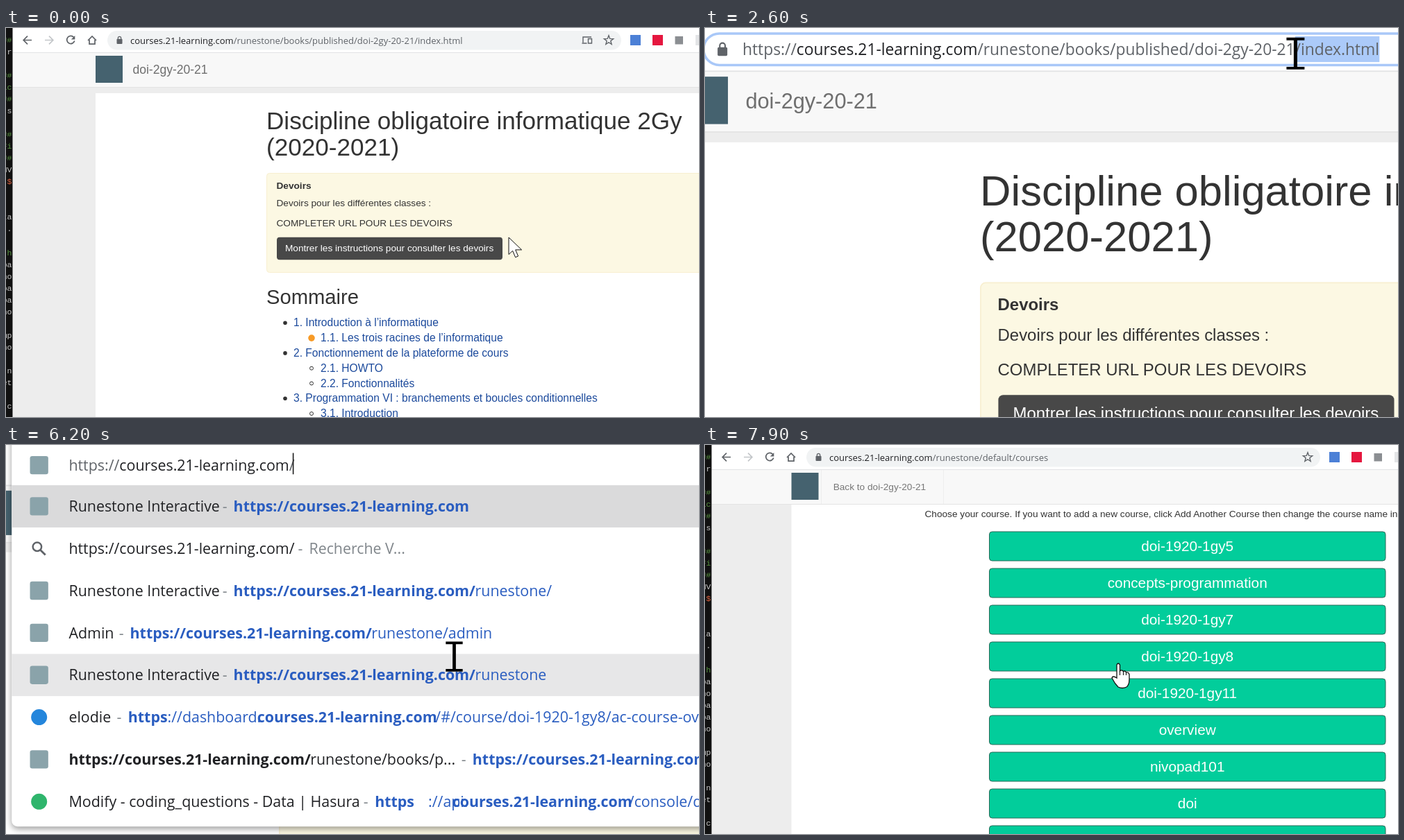
Recreate the animation shown at these times as an HTML page. Size 998 by 561 pixels, loop 8 s.

```html
<!DOCTYPE html>
<html lang="fr">
<head>
<meta charset="utf-8">
<title>Navigation vers la liste des cours</title>
<style>
html, body { margin: 0; width: 100%; height: 100%; overflow: hidden; background: #fff; }
svg { display: block; width: 100%; height: 100%; }
text { white-space: pre; font-family: "Liberation Sans", Arial, sans-serif; }
.ui { font-family: "Open Sans", "Noto Sans", sans-serif; }
.mono { font-family: "Liberation Mono", "DejaVu Sans Mono", monospace; }
.bold { font-weight: 700; }
.line { fill: none; stroke: #5f6368; stroke-width: 1.7; }
</style>
</head>
<body>
<svg id="stage" viewBox="0 0 998 561"></svg>
<script>
const LOOP = 8000, STEP = 100;
const HOST = 'courses.21-learning.com', SITE = 'https://' + HOST;
const INK = '#202124', GREY = '#5f6368', BODY = '#333', BLUE = '#2a5dc0';

const text = (x, y, size, fill, str, cls = '', extra = '') =>
  `<text x="${x}" y="${y}" font-size="${size}" fill="${fill}" class="${cls}" ${extra}>${str}</text>`;
const rect = (x, y, w, h, fill, extra = '') =>
  `<rect x="${x}" y="${y}" width="${w}" height="${h}" fill="${fill}" ${extra}/>`;
const dot = (x, y, r, fill, extra = '') => `<circle cx="${x}" cy="${y}" r="${r}" fill="${fill}" ${extra}/>`;
const line = (d, extra = '') => `<path class="line" d="${d}" ${extra}/>`;
const group = (id, body) => `<g id="${id}">${body}</g>`;
const span = (str, fill) => `<tspan fill="${fill}">${str}</tspan>`;
const small = (x, y, str, cls) => text(x, y, 13.65, BODY, str, cls);

function terminal() {
  const rows = '##,r,,##,ic,##,s,,##,Fi,##,NV,$,,,ta,.,,h,ba,no,ba,ba,no,,mp,no,,n,et,,-c'.split(',');
  const colour = s => s === '$' ? '#d9603f' : /^(##|Fi|ic|h)$/.test(s) ? '#55913f' : '#c8c8c8';
  return rect(-200, 0, 209.5, 561, '#111') + rows.map((s, i) =>
    text(8.5, 21 + i * 17.03, 11.5, colour(s), s, 'mono', 'text-anchor="end"')).join('');
}

function starPath(cx, cy, r) {
  const pts = Array.from({ length: 10 }, (_, i) => {
    const a = i * Math.PI / 5 - Math.PI / 2, k = i % 2 ? r * 0.42 : r;
    return `${cx + k * Math.cos(a)} ${cy + k * Math.sin(a)}`;
  });
  return `M${pts.join('L')}Z`;
}

function header(logoX) {
  return rect(9.5, 36, 1000, 49.5, '#f8f8f8') + rect(9.5, 85, 1000, 1, '#e4e4e4') +
    (logoX ? rect(logoX, 40, 39, 39, '#45626f') : '');
}

function bookPage() {
  const link = (x, y, s) => text(x, y, 15.6, '#1c4a9c', s);
  const toc = [
    [0, '1. Introduction à l’informatique'],
    [1, '1.1. Les trois racines de l’informatique'],
    [0, '2. Fonctionnement de la plateforme de cours'],
    [1, '2.1. HOWTO'],
    [1, '2.2. Fonctionnalités'],
    [0, '3. Programmation VI : branchements et boucles conditionnelles'],
    [1, '3.1. Introduction']
  ];
  const list = toc.map(([sub, s], i) => {
    const y = 430.3 + i * 21.8;
    const mark = i === 1 ? dot(440, y - 5, 4.8, '#f79a26')
      : sub ? dot(440, y - 5, 2.5, 'none', 'stroke="#333"') : dot(402, y - 5, 2.8, BODY);
    return mark + link(sub ? 453 : 414, y, s);
  }).join('');
  return rect(129, 94, 900, 500, '#fff') + header(129) +
    text(182.5, 66, 17.5, '#6f6f6f', 'doi-2gy-20-21') +
    text(375, 145.7, 35.1, BODY, 'Discipline obligatoire informatique 2Gy') +
    text(375, 183.7, 35.1, BODY, '(2020-2021)') +
    rect(375.5, 209.5, 660, 143, '#fcf8e3', 'rx="4" stroke="#f8efd0"') +
    small(389.5, 232, 'Devoirs', 'bold') +
    small(389.5, 257, 'Devoirs pour les différentes classes :') +
    small(389.5, 285.7, 'COMPLETER URL POUR LES DEVOIRS') +
    rect(390, 301.7, 325, 32.5, '#484848', 'rx="4"') +
    text(402, 321.7, 13.65, '#fff', 'Montrer les instructions pour consulter les devoirs') +
    text(375, 397.8, 29.2, BODY, 'Sommaire') + list;
}

function coursePage() {
  const names = ['doi-1920-1gy5', 'concepts-programmation', 'doi-1920-1gy7', 'doi-1920-1gy8',
    'doi-1920-1gy11', 'overview', 'nivopad101', 'doi', 'doi-1920'];
  const mid = 'text-anchor="middle"';
  const buttons = names.map((s, i) =>
    rect(409.5, 265 + 53 * i, 570.5, 42, '#02cd9b', 'rx="4" stroke="#2b6a59"') +
    text(694.7, 293.4 + 53 * i, 20.8, '#fff', s, '', mid)).join('');
  return group('scroller',
    rect(124.5, 94, 900, 800, '#fff') +
    text(695, 145.5, 35.1, BODY, 'Course Selection', '', mid) +
    small(247, 176, 'If you ended up here unexpectedly it is because you are logged in, but trying to access a course that you have not registered for.') +
    small(250, 196, 'good. You can click on the') +
    rect(413, 183, 129, 17, '#f9f2f4', 'rx="3"') +
    text(416, 195.7, 11.3, '#c7254e', 'Enroll in a Course', 'mono') +
    small(546, 196, 'button and register for the course on the profile page. You do this by typing the name') +
    small(614, 215.5, 'into the Course Name box.') +
    small(316.5, 244.3, 'Choose your course. If you want to add a new course, click Add Another Course then change the course name in the') +
    buttons) +
    header(0) + rect(167, 36, 1, 49, '#eee') + rect(343, 36, 1, 49, '#eee') +
    group('logo', rect(124.5, 40, 39, 39, '#45626f')) +
    text(184.7, 64.8, 13.65, '#777', 'Back to doi-2gy-20-21');
}

function toolbar() {
  const url = (id, path) => group(id, text(179, 22.5, 13, INK, HOST + span(path, GREY), 'ui'));
  return rect(9.5, 0, 1000, 35.5, '#fff') + rect(9.5, 35, 1000, 1, '#e2e3e5') +
    line('M37 17.5H25.5M31 11.7l-5.8 5.8 5.8 5.8') +
    line('M56 17.5H67.500M62 11.7l5.8 5.8-5.8 5.8', 'style="stroke:#c3c6c9"') +
    group('reload', line('M97.5 13.3A5.6 5.6 0 1 0 98.700 18.500') + `<path d="M99.300 11v5.500h-5.500z" fill="${GREY}"/>`) +
    group('stop', line('M88 12.500l10 10M98 12.500l-10 10')) +
    line('M118 18l6-6 6 6M120 17v6.200h8v-6.200') +
    group('pill', rect(146, 4, 740, 27.5, '#f1f3f4', 'rx="13.7"')) +
    group('ring', rect(148, 4.500, 738, 26, '#fff', 'rx="13" stroke="#a9c8f8" stroke-width="2"')) +
    rect(159.500, 15.800, 8, 7.200, GREY, 'rx="1"') + line('M161.300 16v-1.500a2.200 2.200 0 0 1 4.400 0v1.500', 'style="stroke-width:1.2"') +
    url('urlBook', '/runestone/books/published/doi-2gy-20-21/index.html') +
    url('urlWait', '/runestone') + url('urlCourses', '/runestone/default/courses') +
    group('edit', rect(0, 6.800, 0, 21.200, '#abcaf9', 'id="sel"') +
      text(180, 22.5, 13, GREY, 'https://' + span(HOST, INK) + '/runestone/books/published/doi-2gy-20-21/index.html', 'ui', 'id="editText"')) +
    group('device', line('M831 21V13h12M829.500 22h7', 'style="stroke-width:1.4"') + line('M838.500 15.500h5v6.500h-5z', 'style="stroke-width:1.4"')) +
    line(starPath(868, 17.800, 7), 'style="stroke-width:1.4"') +
    rect(899, 10, 15, 15, '#4c80d6') + rect(931, 10, 15, 15, '#e5173f') +
    rect(963.500, 12, 11.500, 11.500, '#8b8e92') + rect(993, 10, 14, 15, '#e3e4e6');
}

// Each suggestion: icon, then pieces [x or null to flow on, text, style].
function suggestions() {
  const styles = { k: [INK, ''], g: ['#80868b', ''], b: [BLUE, ''], B: [BLUE, 'bold'], K: [INK, 'bold'] };
  const home = 'Runestone Interactive';
  const rows = [
    ['s', [191, home, 'k'], [325.5, '-', 'g'], [335.2, SITE, 'B']],
    ['q', [191, SITE + '/', 'k'], [391.700, '-', 'g'], [401.400, 'Recherche V...', 'g']],
    ['s', [191, home, 'k'], [325.5, '-', 'g'], [335.2, SITE + '/', 'B'], [546.8, 'runestone/', 'b']],
    ['s', [191, 'Admin', 'k'], [235, '-', 'g'], [244.600, SITE + '/', 'B'], [456, 'runestone/admin', 'b']],
    ['s', [191, home, 'k'], [325.5, '-', 'g'], [335.2, SITE + '/', 'B'], [546.8, 'runestone', 'b']],
    ['#2486dc', [191, 'elodie', 'k'], [233, '-', 'g'], [242.900, 'https', 'B'], [null, '://dashboard.', 'b'],
      [356, HOST, 'B'], [512, '/#/course/doi-1920-1gy8/ac-course-overview', 'b']],
    ['s', [191, SITE + '/', 'K'], [402.500, 'runestone/books/p...', 'k'], [534.800, '-', 'g'],
      [544.500, SITE + '/', 'B'], [null, 'runestone/books', 'b']],
    ['#2fb56c', [191, 'Modify - coding_questions - Data | Hasura', 'k'], [449, '-', 'g'], [459, 'https', 'B'],
      [505.700, '://api.', 'b'], [526.800, HOST, 'B'], [681.300, '/console/data', 'b']]
  ];
  const icon = (kind, y) => kind === 's' ? rect(157, y - 8, 16, 16, '#8aa3aa', 'rx="2"')
    : kind === 'q' ? dot(163.300, y - 1.500, 3.800, 'none', `stroke="${GREY}" stroke-width="1.5"`) + line(`M166 ${y + 1.200}l4.500 4.500`)
    : dot(165, y, 7, kind);
  const body = rows.map(([kind, ...parts], i) => {
    const spans = parts.map(([x, s, k]) =>
      `<tspan ${x ? `x="${x}"` : ''} fill="${styles[k][0]}" class="${styles[k][1]}">${s}</tspan>`).join('');
    return icon(kind, 53.700 + 37 * i) + text(191, 58.400 + 37 * i, 13, INK, spans, 'ui');
  }).join('');
  return rect(141, -12, 750, 346.500, '#fff', 'rx="5" style="filter:drop-shadow(0 2px 3px #0006)"') +
    rect(141, 35.300, 750, 37, '#dadadb') + rect(141, 183.200, 750, 37, '#e7e7e8') +
    icon('s', 17.700) + text(191, 22.5, 13, GREY, 'https://' + span(HOST, INK) + '/', 'ui') +
    group('caret', rect(387, 7, 1, 18.700, '#222')) + body;
}

const pointers =
  group('arrow', '<path d="M0 0V24.500L5.600 19.300 9.600 28.700 13.600 27 9.700 17.900H18.600Z" fill="#fff" stroke="#111"/>') +
  group('beam', '<path d="M-7.400-12H7.400M-7.400 12H7.400" stroke="#000" stroke-width="2.2"/><path d="M0-12V12" stroke="#000" stroke-width="2.9"/>') +
  group('hand', '<path d="M-2 1Q0-3 2.500 1V10Q5 7.500 7.500 10.500Q10 9 11.500 12Q15 11 16 15V22Q16 30 12 33Q6 36 0 33Q-5 28-9 20Q-8 16-2 20Z" fill="#fff" stroke="#111" stroke-width="1.3"/><path d="M2.500 10v6M7.500 11v5M11.500 12v4" stroke="#111" stroke-width="1.1"/>');

document.getElementById('stage').innerHTML = group('camera',
  rect(9.5, 0, 1000, 561, '#ededed') + group('book', bookPage()) + group('courses', coursePage()) +
  toolbar() + terminal() +
  group('status', rect(5, 548, 466, 20, '#dee1e6', 'rx="3"') + text(13, 563, 11, GREY, 'En attente de ' + HOST + '...', 'ui')) +
  group('drop', suggestions()) + group('pointer', pointers));

const el = id => document.getElementById(id);
const show = (id, on) => { el(id).style.display = on ? '' : 'none'; };

// Caret stops inside the editable address, from the end of the host on.
const edit = el('editText'), first = (SITE + '/').length;
const stops = Array.from({ length: edit.getNumberOfChars() - first }, (_, i) => edit.getStartPositionOfChar(first + i).x);
const urlEnd = 180 + edit.getComputedTextLength();
stops.push(urlEnd);

const moves = [
  [0, 724, 302, 'arrow'], [850, 724, 302, 'arrow'], [1900, 691.500, 47, 'arrow'], [2100, 706, 20, 'beam'],
  [2300, 706, 20, 'beam'], [2600, 634, 21, 'beam'], [3500, 383, 21.700, 'beam'], [3700, 382, 21.700, 'beam'],
  [3800, 379, 21.700, 'beam'], [4000, 380, 21.700, 'beam'], [4100, 380, 21.700, 'beam'], [4350, 572, 150, 'beam'],
  [4500, 528.500, 185.500, 'beam'], [6300, 528.500, 185.500, 'beam'], [6900, 540.500, 204.500, 'beam'],
  [7200, 565, 262, 'hand'], [7600, 595, 316, 'hand'], [LOOP, 595, 316, 'hand']
];
const ease = p => (1 - Math.cos(Math.PI * Math.min(1, Math.max(0, p)))) / 2;

function pointerAt(t) {
  const i = moves.findIndex(m => m[0] > t) - 1;
  const [t0, x0, y0, kind] = moves[i], [t1, x1, y1] = moves[i + 1];
  const p = ease((t - t0) / (t1 - t0));
  return { x: x0 + (x1 - x0) * p, y: y0 + (y1 - y0) * p, kind };
}

function draw(t) {
  const s = 1 + 0.754 * (ease((t - 1100) / 985) - ease((t - 5955) / 985));
  el('camera').setAttribute('transform', `translate(${347 * (1 - s)} 0) scale(${s})`);

  const editing = t >= 2200 && t < 5200, open = t >= 5200 && t < 6400;
  const loading = t >= 6400 && t < 7100, arrived = t >= 6700;
  show('book', !arrived);
  show('courses', arrived);
  show('logo', t >= 7100);
  show('status', loading && arrived);
  show('reload', !loading);
  show('stop', loading);
  show('urlBook', t < 2200);
  show('urlWait', t >= 6400 && !arrived);
  show('urlCourses', arrived);
  show('device', t < 2200);
  show('edit', editing);
  show('ring', editing);
  show('pill', !editing);
  show('drop', open);
  show('caret', t < 5700 || t >= 6200);
  el('drop').style.opacity = t < 5300 ? 0.97 : 1;
  el('scroller').setAttribute('transform', `translate(0 ${-140 * Math.min(1, Math.max(0, (t - 7660) / 240))})`);

  const p = pointerAt(t);
  el('pointer').setAttribute('transform', `translate(${p.x} ${p.y})`);
  for (const kind of ['arrow', 'beam', 'hand']) show(kind, kind === p.kind);

  const aim = t >= 3800 ? stops[0] : p.x;
  const from = t < 2300 ? urlEnd : stops.reduce((a, b) => Math.abs(b - aim) < Math.abs(a - aim) ? b : a);
  el('sel').setAttribute('x', from);
  el('sel').setAttribute('width', urlEnd - from);
}

const start = performance.now();
function tick() {
  const t = (performance.now() - start) % LOOP;
  draw(Math.floor(t / STEP) * STEP);
  requestAnimationFrame(tick);
}
tick();
</script>
</body>
</html>
```
